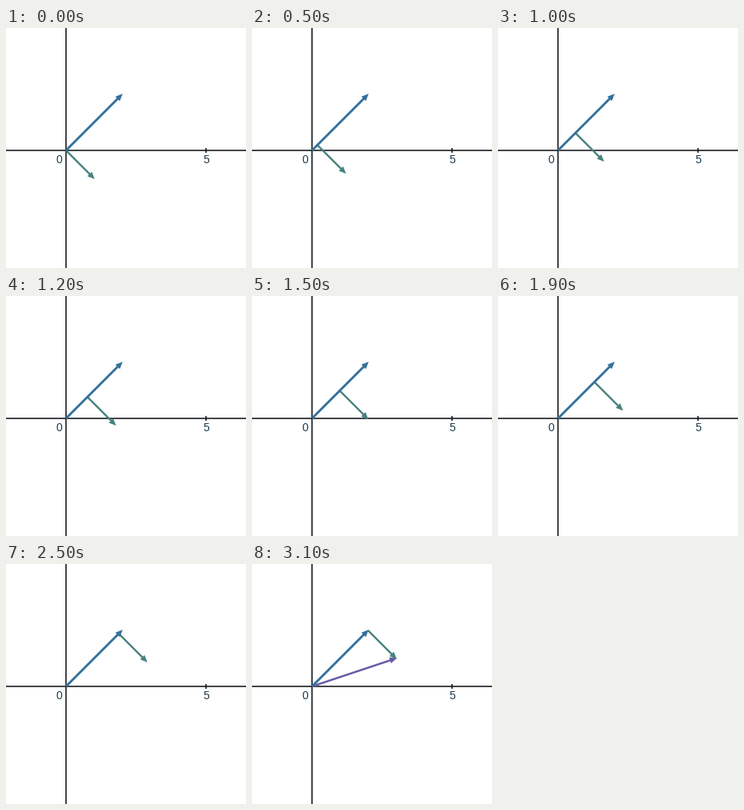
Animation of 300 by 300 pixels, one loop 3.5 s. Source, as a matplotlib script:

```python
import numpy as np
import matplotlib.pyplot as plt
from matplotlib.animation import FuncAnimation
from matplotlib.patches import Polygon

SIZE, DPI = 300, 100
STEP = 100                      # ms per frame
FRAMES = 35
UNIT = 35                       # pixels per axis unit
ORIGIN = np.array([75.0, 153.0])
INK, BLUE, TEAL, PURPLE = "#15191c", "#34709c", "#47827f", "#695ca6"

A = np.array([2, 2])
B = np.array([1, -1])

fig = plt.figure(figsize=(SIZE / DPI, SIZE / DPI), dpi=DPI, facecolor="white")
ax = fig.add_axes([0, 0, 1, 1])
ax.set_xlim(0, SIZE)
ax.set_ylim(SIZE, 0)
ax.axis("off")


def pt(px):
    return px * 72 / DPI


def to_px(p):
    return ORIGIN + UNIT * np.asarray(p, float) * [1, -1]


def line(x, y, width=1.6):
    ax.plot(x, y, color=INK, lw=pt(width), snap=False, solid_capstyle="butt")


class Arrow:
    HEAD, HALF = 9.0, 3.9

    def __init__(self, color, width, z):
        self.shaft, = ax.plot([], [], color=color, lw=pt(width), zorder=z,
                              solid_capstyle="butt", snap=False)
        self.head = Polygon(np.zeros((3, 2)), fc=color, ec="none", zorder=z)
        ax.add_patch(self.head)

    def place(self, start, end):
        p, q = to_px(start), to_px(end)
        u = (q - p) / np.hypot(*(q - p))
        n = np.array([-u[1], u[0]])
        tip = q + u * 1.2
        base = tip - u * self.HEAD
        self.shaft.set_data(*zip(p, base + u))
        self.head.set_xy([tip, base + n * self.HALF, base - n * self.HALF])

    def show(self, on):
        self.shaft.set_visible(on)
        self.head.set_visible(on)


line([0, SIZE], [ORIGIN[1]] * 2)
line([ORIGIN[0]] * 2, [0, SIZE])
line([250, 250], [150, 156])
for x, label in ((66.3, "0"), (250, "5")):
    ax.text(x, 169, label, ha="center", va="baseline", color="#1c3c50",
            fontname="Liberation Sans", fontsize=pt(14))

total = Arrow(PURPLE, 2.5, 5)
moving = Arrow(TEAL, 2.4, 4)
fixed = Arrow(BLUE, 2.9, 6)
fixed.place((0, 0), A)
total.place((0, 0), A + B)


def slide(ms):
    """Distance along A, in axis units, of the moving arrow's tail."""
    return np.interp(ms, [300, 800, 1200, 1500, 1900, 2200, 2600],
                     [0, 0.48, 0.765, 0.99, 1.30, 1.535, 2])


def draw(i):
    ms = i * STEP
    tail = A / 2 * slide(ms)
    moving.place(tail, tail + B)
    total.show(ms >= 3100)
    return []


anim = FuncAnimation(fig, draw, frames=FRAMES, interval=STEP,
                     repeat=True, repeat_delay=0, blit=False)
plt.show()
```
